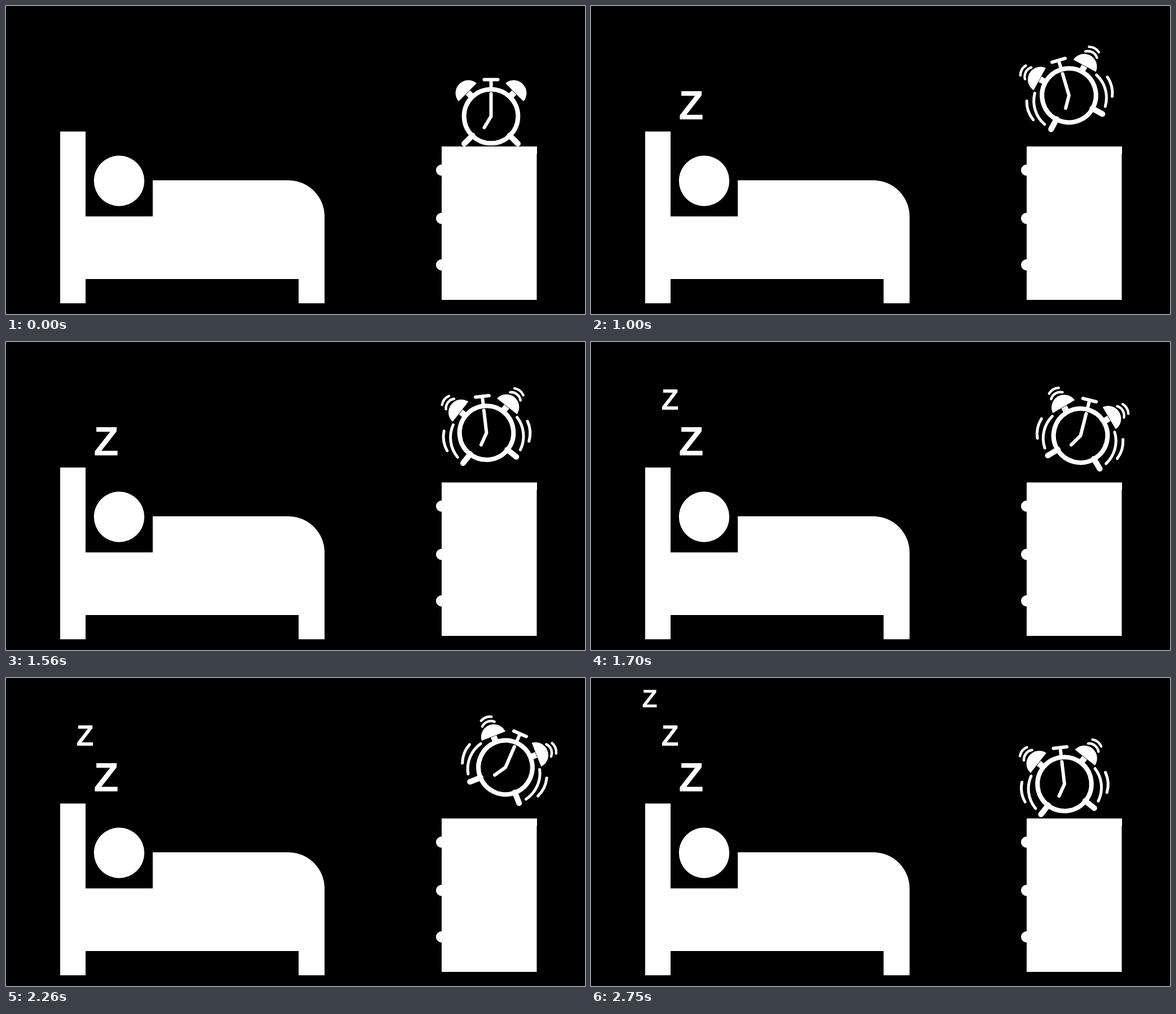
An HTML page for the animation above (3.1 s loop, 1026x546 px).

```html
<!DOCTYPE html>
<html lang="en">
<head>
<meta charset="utf-8">
<title>Alarm clock</title>
<style>
  html, body { margin: 0; width: 100%; height: 100%; overflow: hidden; background: #000; }
  svg { display: block; width: 100%; height: 100%; fill: #fff; }
  text { font: bold 72.7px "Liberation Sans", Arial, sans-serif; text-anchor: middle; }
  .line { fill: none; stroke: #fff; stroke-linecap: round; stroke-linejoin: round; }
</style>
</head>
<body>
<svg viewBox="0 0 1026 546">
  <defs>
    <g id="side">
      <path d="M57.5 -26.5A22.7 22.7 0 0 0 25.5 -58.5Z"/>
      <path class="line" style="stroke-linecap:butt" stroke-width="11" d="M41 -42L32 -33"/>
      <path class="line" stroke-width="10" d="M33 34L47.5 48.5"/>
    </g>
    <g id="waves" class="line">
      <path stroke-width="5" d="M57 -21A55 55 0 0 1 56 37M74.5 -12A51 51 0 0 1 73 23.5"/>
      <path stroke-width="4.4" d="M50 -66.5A17 17 0 0 1 66.5 -50M58.5 -72.5A21 21 0 0 1 72.5 -58.5"/>
    </g>
  </defs>

  <path d="M96 222.5H141V373H260V309H500A64.5 64 0 0 1 564.5 373V527H518.5V484H141V527H96Z"/>
  <circle cx="200.5" cy="310" r="44.7"/>

  <path d="M772 249H941V262H940.5V521H772Z"/>
  <circle cx="772" cy="291" r="10"/>
  <circle cx="772" cy="376.5" r="10"/>
  <circle cx="772" cy="459" r="10"/>

  <g id="clock">
    <circle class="line" r="47.8" stroke-width="8"/>
    <path class="line" stroke-width="6" d="M-12 -65H12M0 -65V-50M0 -40V0L-12 20"/>
    <use href="#side"/>
    <use href="#side" transform="scale(-1 1)"/>
    <g id="ring">
      <use href="#waves"/>
      <use href="#waves" transform="scale(-1 1)"/>
    </g>
  </g>

  <text class="z" x="177.5" y="200.5">Z</text>
  <text class="z" x="140" y="120" style="font-size:51px">Z</text>
  <text class="z" x="104" y="52" style="font-size:45px">Z</text>
</svg>
<script>
  const LOOP = 3100, REST = 1000, STEP = 350;
  // x, y, tilt
  const poses = [
    [859.5, 195.5, 0],
    [847, 158.5, -16.5],
    [851.5, 161, -6.7],
    [867.5, 166, 14.3],
    [885, 158.5, 23.5],
    [856, 162, 7.2],
    [839, 188, -6.7]
  ];
  const clock = document.getElementById("clock");
  const ring = document.getElementById("ring");
  const zs = document.querySelectorAll(".z");
  const show = (el, on) => el.setAttribute("visibility", on ? "visible" : "hidden");

  function draw(time) {
    const t = time % LOOP;
    const step = t < REST ? 0 : 1 + Math.floor((t - REST) / STEP);
    const [x, y, tilt] = poses[step];
    clock.setAttribute("transform", `translate(${x} ${y}) rotate(${tilt})`);
    show(ring, step > 0);
    // a further Z every second step
    zs.forEach((z, i) => show(z, step > 2 * i));
  }

  const start = performance.now();
  function tick() {
    draw(performance.now() - start);
    requestAnimationFrame(tick);
  }
  tick();
</script>
</body>
</html>
```
